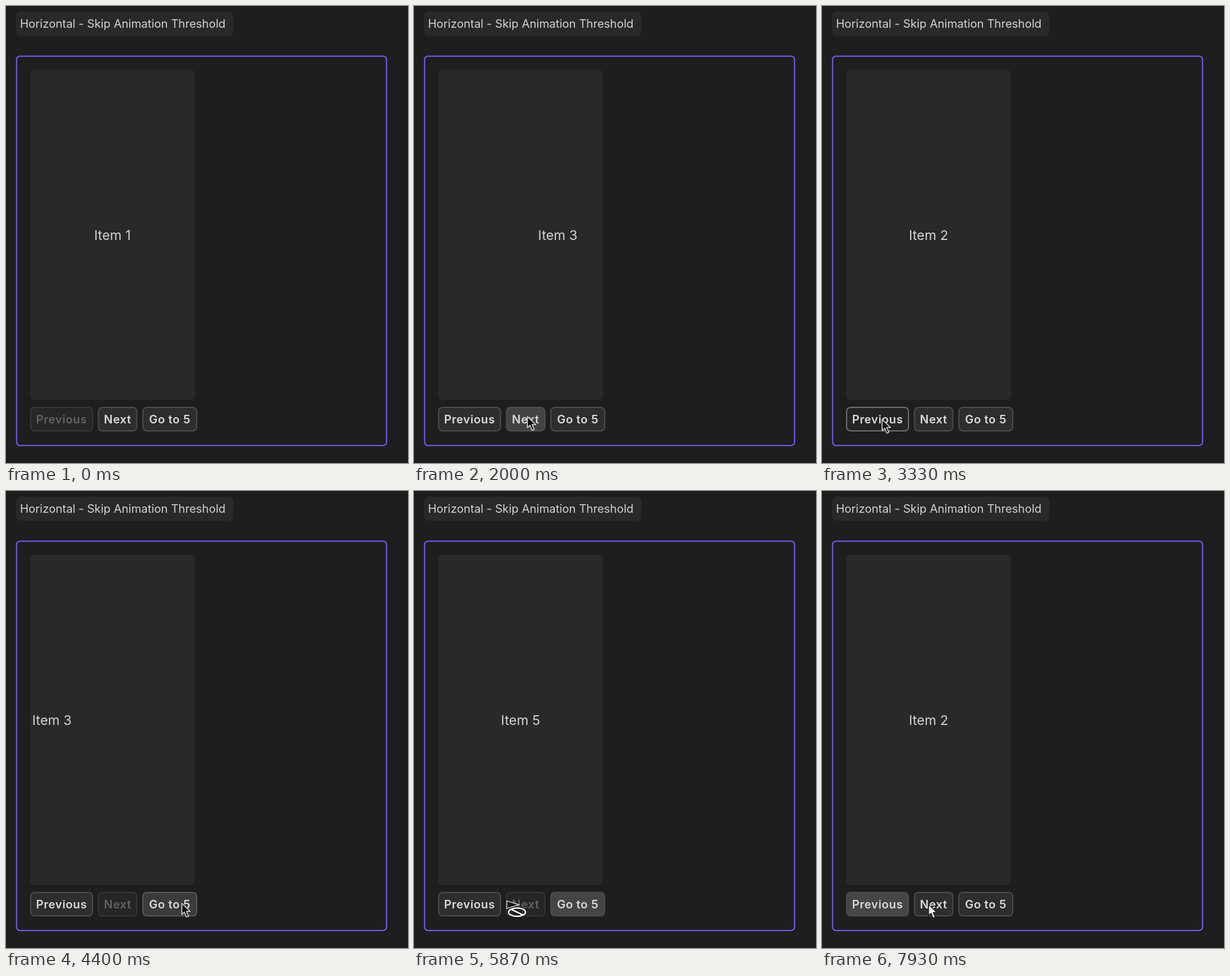
Animation, 702 px wide and 797 px high, one loop 8000 ms. Source, as an HTML page:

```html
<!DOCTYPE html>
<html lang="en">
<head>
<meta charset="utf-8">
<title>Horizontal carousel</title>
<style>
  html, body { margin: 0; width: 100%; height: 100%; overflow: hidden; background: #1e1e1e; }
  svg { display: block; font-family: Inter, sans-serif; }
  .item { font-size: 23.3px; fill: #d3d3d3; text-anchor: middle; }
  .button text { font-size: 20px; font-weight: 600; letter-spacing: .6px; fill: #dadada; text-anchor: middle; }
</style>
</head>
<body>
<svg width="702" height="797" viewBox="0 0 702 797">
  <defs><clipPath id="view"><rect x="42" y="111" width="288" height="576" rx="8"/></clipPath></defs>
  <rect width="702" height="797" fill="#1e1e1e"/>
  <rect x="17.5" y="10" width="379.5" height="42" rx="8" fill="#292929"/>
  <text x="24.5" y="38" font-size="20" fill="#d3d3d3">Horizontal - Skip Animation Threshold</text>
  <rect x="18.5" y="87.5" width="646" height="679" rx="6" fill="none" stroke="#7b61f8" stroke-width="2"/>
  <rect x="42" y="111" width="288" height="576" rx="8" fill="#292929"/>
  <g clip-path="url(#view)"><g id="track"></g></g>
  <g id="buttons"></g>
  <g id="cursor">
    <path id="arrow" d="M0 0V19.5L4.5 15.5 8.2 24 11.8 22.4 8.2 14.2H14.5Z" stroke-width="1.7" stroke-linejoin="round"/>
    <g id="forbidden" fill="none">
      <path d="M0 1L21 7.5 0 14Z" fill="#111" stroke="#ccc" stroke-width="1.6"/>
      <g id="sign"><ellipse cx="18" cy="20.5" rx="14.8" ry="7.3"/><path d="M7.5 15.5L28.5 25.5"/></g>
    </g>
  </g>
</svg>
<script>
const LOOP = 8000, STEP = 1000 / 15, PAGE = 288, SLIDE = 260;
const $ = id => document.getElementById(id);
const clamp = v => Math.max(0, Math.min(1, v));
const mix = (a, b, k) => a + (b - a) * k;
const smooth = k => (k = clamp(k), k * k * (3 - 2 * k));
const gray = v => `rgb(${[v, v, v].map(Math.round)})`;

function add(parent, name, attrs, text = '') {
  const node = document.createElementNS('http://www.w3.org/2000/svg', name);
  for (const key in attrs) node.setAttribute(key, attrs[key]);
  node.textContent = text;
  return parent.appendChild(node);
}

for (let i = 0; i < 5; i++)
  add($('track'), 'text', { class: 'item', x: 186 + i * PAGE, y: 408 }, `Item ${i + 1}`);

// White ring and slash over a dark outline
const sign = $('sign'), outline = sign.cloneNode(true);
outline.removeAttribute('id');
sign.before(outline);
outline.setAttribute('stroke', '#111');
outline.setAttribute('stroke-width', 5);
sign.setAttribute('stroke', '#fff');
sign.setAttribute('stroke-width', 2.6);

// hover: [enter, leave]; clicks: [release time, page]
const buttons = [
  { label: 'Previous', x: 42, width: 110, end: 0, hover: [[2540, 3400], [5960, 7936]],
    clicks: [[2900, 1], [3360, 0], [6310, 3], [6695, 2], [7150, 1]] },
  { label: 'Next', x: 160.5, width: 69, end: 4, hover: [[870, 2500], [7936, 8000]],
    clicks: [[1300, 1], [1820, 2]] },
  { label: 'Go to 5', x: 238, width: 96, end: -1, hover: [[3800, 5860]], clicks: [[4262, 4]] },
];
const moves = buttons.flatMap(b => b.clicks).sort((a, b) => a[0] - b[0]);

for (const b of buttons) {
  const group = add($('buttons'), 'g', { class: 'button' });
  b.box = add(group, 'rect', { x: b.x + 1, y: 700, width: b.width - 2, height: 41, rx: 7, 'stroke-width': 2 });
  b.text = add(group, 'text', { x: b.x + b.width / 2, y: 727.5 }, b.label);
}

// Pointer stops: time, x, y
const path = [
  [130, 508, 702], [267, 490, 637], [540, 490, 637], [900, 198, 716], [2470, 198, 716],
  [2660, 108, 721], [3300, 105, 721], [3600, 105, 721], [3667, 149, 720], [3900, 307, 719],
  [5740, 307, 719], [5866, 162, 714], [5933, 146, 720], [6000, 126, 712], [7867, 126, 712],
  [7933, 186, 721], [8000, 186, 721],
];

function scrollAt(t) {
  let position = 0, page = 0;
  for (const [start, next] of moves) {
    if (t < start) break;
    const far = Math.abs(next - page) > 1;
    position += (next - page) * (far ? 1 - Math.exp((start - t) / 154) : smooth((t - start) / SLIDE));
    page = next;
  }
  return { position, page };
}

function pressAt(t, release) {
  return t < release ? clamp((t - release + 50) / 20) : clamp(1 - (t - release) / 200);
}

function drawButton(b, t, page) {
  const disabled = page === b.end;
  const hover = Math.max(...b.hover.map(([a, z]) => clamp((t - a) / 130) * clamp(1 - (t - z) / 130)));
  const press = Math.max(...b.clicks.map(([release]) => pressAt(t, release)));
  b.box.setAttribute('fill', disabled ? '#262626' : gray(mix(mix(46, 70, hover), 36, press)));
  b.box.setAttribute('stroke', disabled ? '#373737' : gray(mix(76, 112, press)));
  b.text.style.fill = disabled ? '#626262' : '#dadada';
}

function drawCursor(t) {
  $('cursor').style.display = t < 130 ? 'none' : '';
  const next = Math.max(1, path.findIndex(p => p[0] > t));
  const [t0, x0, y0] = path[next - 1], [t1, x1, y1] = path[next];
  const k = smooth((t - t0) / (t1 - t0));
  $('cursor').setAttribute('transform', `translate(${mix(x0, x1, k)} ${mix(y0, y1, k)})`);
  const blocked = t > 3400 && t < 3640 || t > 5840 && t < 5900;
  const over = buttons.some(b => b.hover.some(([a, z]) => t >= a && t < z)) && t < 7900;
  $('arrow').style.display = blocked ? 'none' : '';
  $('forbidden').style.display = blocked ? '' : 'none';
  $('arrow').setAttribute('fill', over ? '#111' : '#fff');
  $('arrow').setAttribute('stroke', over ? '#ccc' : '#222');
}

function draw(now) {
  const t = Math.floor((now % LOOP + 4) / STEP) * STEP % LOOP;
  const { position, page } = scrollAt(t);
  $('track').setAttribute('transform', `translate(${-position * PAGE} 0)`);
  for (const b of buttons) drawButton(b, t, page);
  drawCursor(t);
}

const began = performance.now();
(function tick() {
  draw(performance.now() - began);
  requestAnimationFrame(tick);
})();
</script>
</body>
</html>
```
